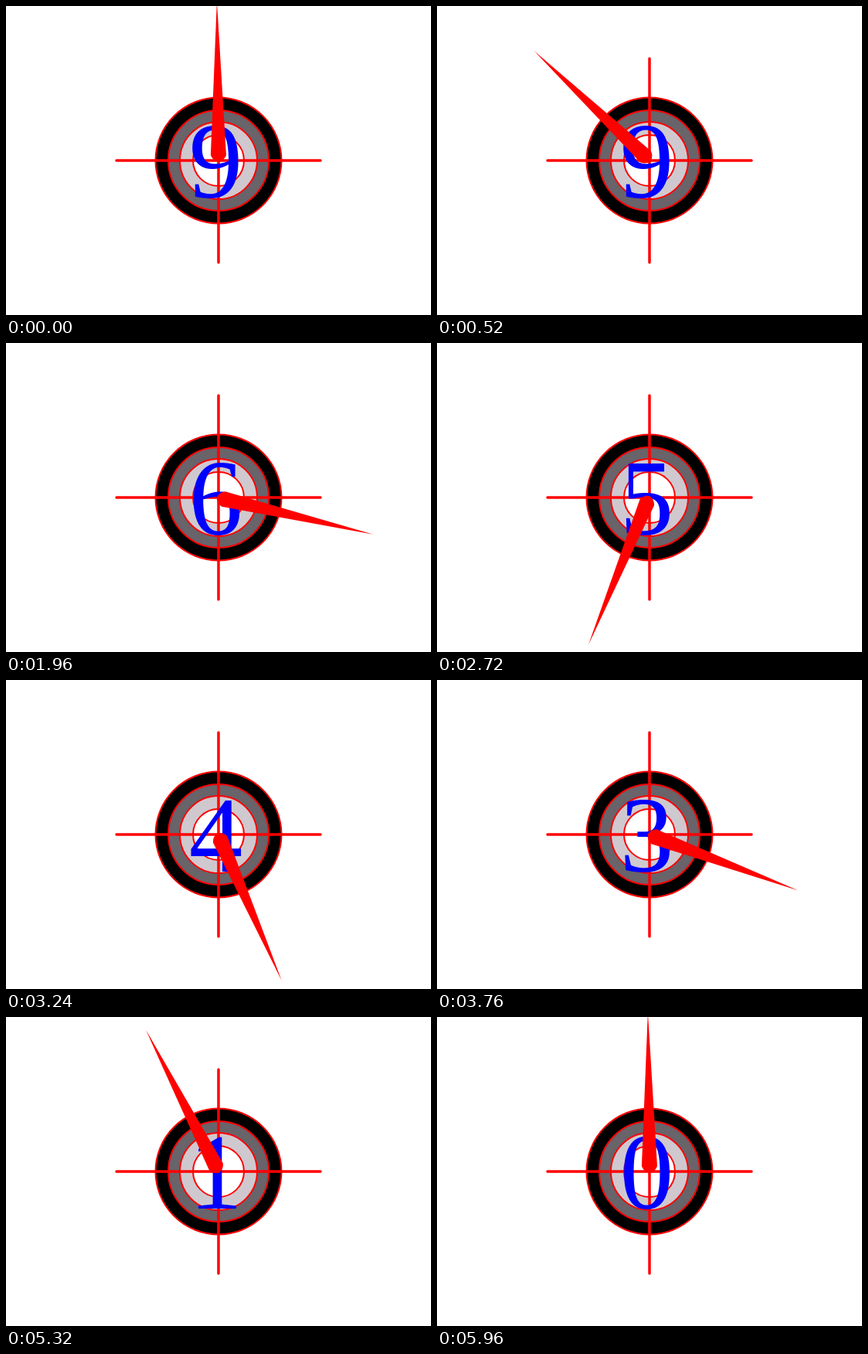
An HTML page with a canvas for the animation above (6 s loop, 550 by 400 pixels).

```html
<!DOCTYPE html>
<html lang="en">
<head>
<meta charset="utf-8">
<title>Countdown</title>
<style>
  html, body { margin: 0; width: 100%; height: 100%; overflow: hidden; background: #fff; }
  canvas { display: block; width: 550px; height: 400px; }
</style>
</head>
<body>
<canvas id="stage" width="550" height="400"></canvas>
<script>
const ctx = document.getElementById('stage').getContext('2d');
const RED = '#f00';
const CX = 275, CY = 200;
const STEP = 40, STEPS = 150, TURNS = 10, DIGIT_STEPS = 15;

const rings = [
  [81.5, '#000'],
  [65, '#69636a'],
  [50, '#cfc9cf'],
  [33, '#fff']
];

function drawRing([radius, fill]) {
  ctx.beginPath();
  ctx.arc(CX, CY, radius, 0, Math.PI * 2);
  ctx.fillStyle = fill;
  ctx.fill();
  ctx.lineWidth = 2;
  ctx.stroke();
}

function drawCross() {
  const arm = 132;
  ctx.lineWidth = 3.5;
  ctx.lineCap = 'round';
  ctx.beginPath();
  ctx.moveTo(CX - arm, CY);
  ctx.lineTo(CX + arm, CY);
  ctx.moveTo(CX, CY - arm);
  ctx.lineTo(CX, CY + arm);
  ctx.stroke();
}

function drawDigit(digit) {
  ctx.font = '139px "Liberation Serif", "Times New Roman", serif';
  ctx.textAlign = 'center';
  ctx.textBaseline = 'alphabetic';
  ctx.fillStyle = '#00f';
  ctx.fillText(digit, 271.5, 247.5);
}

function drawHand(angle) {
  ctx.save();
  ctx.translate(274.7, CY);
  ctx.rotate(angle);
  ctx.beginPath();
  ctx.moveTo(-1.8, -206);
  ctx.lineTo(10.3, -7);
  ctx.quadraticCurveTo(8, 0, 0.3, 2);
  ctx.quadraticCurveTo(-7.5, 0, -9.8, -7);
  ctx.closePath();
  ctx.fillStyle = RED;
  ctx.fill();
  ctx.restore();
}

function draw(time) {
  const step = Math.floor(time / STEP) % STEPS;
  ctx.fillStyle = '#fff';
  ctx.fillRect(0, 0, 550, 400);
  ctx.strokeStyle = RED;
  rings.forEach(drawRing);
  drawCross();
  drawDigit(9 - Math.floor(step / DIGIT_STEPS));
  // The last step lands exactly on the starting pose.
  drawHand(TURNS * Math.PI * 2 * step / (STEPS - 1));
}

const start = performance.now();
function tick() {
  draw(performance.now() - start);
  requestAnimationFrame(tick);
}
tick();
</script>
</body>
</html>
```
